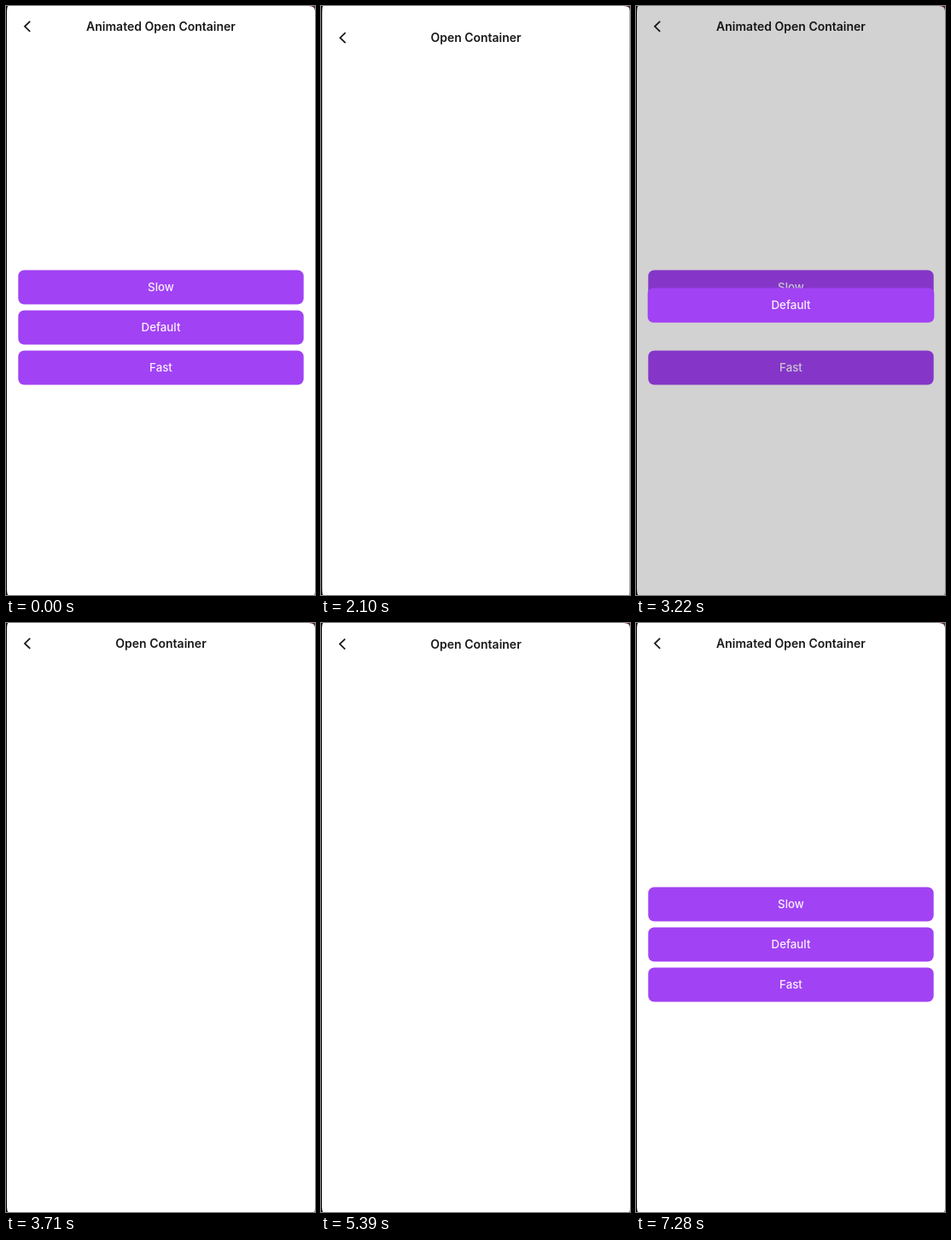
These frames come from a looping animation (362x688 px, 7.35 s). An HTML page with a canvas:

```html
<!DOCTYPE html>
<html lang="en">
<head>
<meta charset="utf-8">
<title>Animated Open Container</title>
<style>
  html, body { margin: 0; width: 100%; height: 100%; overflow: hidden; background: #fff; }
  canvas { display: block; width: 362px; height: 688px; }
</style>
</head>
<body>
<canvas id="stage"></canvas>
<script>
const W = 362, H = 688, LOOP = 7350, STEP = 70;
const PURPLE = '#a142f4', INK = '#1a1a1c';
const SCRIM = 0.54, HEADER = 41.5, HEADER_LEAD = 28;
const FONT = 'Inter, "Open Sans", sans-serif';

// The phone screen reaches beyond the stage at the top and bottom.
const SCREEN = { x: 1, y: -44.5, w: 361, h: 781.5 };
const BUTTONS = ['Slow', 'Default', 'Fast'].map((label, i) =>
  ({ label, x: 14.3, y: 308.4 + 47 * i, w: 334.4, h: 40.2 }));

// start and duration of opening and closing, in ms
const RUNS = [
  { button: 0, open: [333, 840], close: [2022, 655] },
  { button: 1, open: [3132, 590], close: [4275, 400] },
  { button: 2, open: [5220, 180], close: [6345, 220] }
];

const canvas = document.getElementById('stage');
const ctx = canvas.getContext('2d');
const dpr = window.devicePixelRatio || 1;
canvas.width = Math.round(W * dpr);
canvas.height = Math.round(H * dpr);

const clamp = x => Math.min(1, Math.max(0, x));
const mix = (a, b, k) => a + (b - a) * k;

// cubic-bezier(.4, 0, .2, 1)
function ease(x) {
  if (x <= 0 || x >= 1) return clamp(x);
  let lo = 0, hi = 1;
  for (let i = 0; i < 24; i++) {
    const u = (lo + hi) / 2, r = 1 - u;
    if (1.2 * r * r * u + 0.6 * r * u * u + u * u * u < x) lo = u; else hi = u;
  }
  return lo * lo * (3 - 2 * lo);
}

function roundRect(x, y, w, h, r) {
  ctx.beginPath();
  ctx.roundRect(x, y, w, h, r);
}

function text(str, x, y, weight, size, color) {
  ctx.font = `${weight} ${size}px ${FONT}`;
  ctx.textAlign = 'center';
  ctx.textBaseline = 'alphabetic';
  ctx.fillStyle = color;
  ctx.fillText(str, x, y);
}

function header(title) {
  ctx.strokeStyle = INK;
  ctx.lineWidth = 1.8;
  ctx.beginPath();
  ctx.moveTo(28.2, 17.8);
  ctx.lineTo(22, 23.8);
  ctx.lineTo(28.2, 29.8);
  ctx.stroke();
  text(title, 181.5, 28.9, 600, 14, INK);
}

function button(b) {
  ctx.fillStyle = PURPLE;
  roundRect(b.x, b.y, b.w, b.h, 7);
  ctx.fill();
  text(b.label, b.x + b.w / 2, b.y + b.h / 2 + 4.7, 500, 13.3, '#f8f0ff');
}

function homePage(hidden) {
  ctx.fillStyle = '#fff';
  ctx.fillRect(0, 0, W, H);
  header('Animated Open Container');
  BUTTONS.forEach((b, i) => { if (i !== hidden) button(b); });
}

function openPage() {
  ctx.fillStyle = '#fff';
  ctx.fillRect(SCREEN.x, SCREEN.y, SCREEN.w, SCREEN.h);
  header('Open Container');
}

function shade(alpha, y0, y1) {
  ctx.fillStyle = `rgba(0,0,0,${alpha})`;
  ctx.fillRect(0, y0, W, y1 - y0);
}

// Draws in the coordinates of a box scaled to the container's width.
function fitted(box, rect, draw) {
  const k = rect.w / box.w;
  ctx.save();
  ctx.translate(rect.x, rect.y);
  ctx.scale(k, k);
  ctx.translate(-box.x, -box.y);
  draw();
  ctx.restore();
}

function container(b, v, fade) {
  const rect = {};
  for (const key of ['x', 'y', 'w', 'h']) rect[key] = mix(b[key], SCREEN[key], v);
  ctx.save();
  roundRect(rect.x, rect.y, rect.w, rect.h, 4 * (1 - v));
  ctx.clip();
  if (fade < 1) fitted(b, rect, () => button(b));
  if (fade > 0) {
    ctx.globalAlpha = fade;
    ctx.fillStyle = '#fff';
    ctx.fillRect(rect.x, rect.y, rect.w, rect.h);
    fitted(SCREEN, rect, openPage);
  }
  ctx.restore();
}

function transition(run, t, closing) {
  const [start, span] = closing ? run.close : run.open;
  const s = (t - start) / span;
  const v = closing ? 1 - ease(s) : ease(s);
  const fadeIn = clamp((s - 0.2) / 0.2);
  homePage(run.button);
  if (closing) {
    const ahead = 1 - ease((t + HEADER_LEAD - start) / span);
    shade(SCRIM * ahead, 0, HEADER);
    shade(SCRIM * v, HEADER, H);
  } else {
    shade(SCRIM * clamp(v * 5), 0, H);
  }
  container(BUTTONS[run.button], v, closing ? 1 - fadeIn : fadeIn);
}

function corner(x, y, dx, dy, color) {
  ctx.fillStyle = color;
  ctx.beginPath();
  ctx.moveTo(x, y);
  ctx.lineTo(x + dx, y);
  ctx.quadraticCurveTo(x, y, x, y + dy);
  ctx.fill();
}

function bezel() {
  ctx.fillStyle = '#000';
  ctx.fillRect(0, 0, 1, H);
  corner(1, 0, 1.5, 9, '#000');
  corner(1, H, 1.5, -9, '#000');
  corner(W, 0, -7, 6, '#5c2633');
  corner(W, H, -1.5, -6, '#777');
}

function scene(t) {
  for (const run of RUNS) {
    const [o, od] = run.open, [c, cd] = run.close;
    if (t > o && t < o + od) return transition(run, t, false);
    if (t >= o + od && t <= c) return openPage();
    if (t > c && t < c + cd) return transition(run, t, true);
  }
  homePage(-1);
}

function draw(now) {
  const t = Math.floor((now % LOOP) / STEP) * STEP;
  ctx.setTransform(dpr, 0, 0, dpr, 0, 0);
  scene(t);
  bezel();
}

let begin = null;
function tick(now) {
  if (begin === null) begin = now;
  draw(now - begin);
  requestAnimationFrame(tick);
}
draw(0);
requestAnimationFrame(tick);
</script>
</body>
</html>
```
